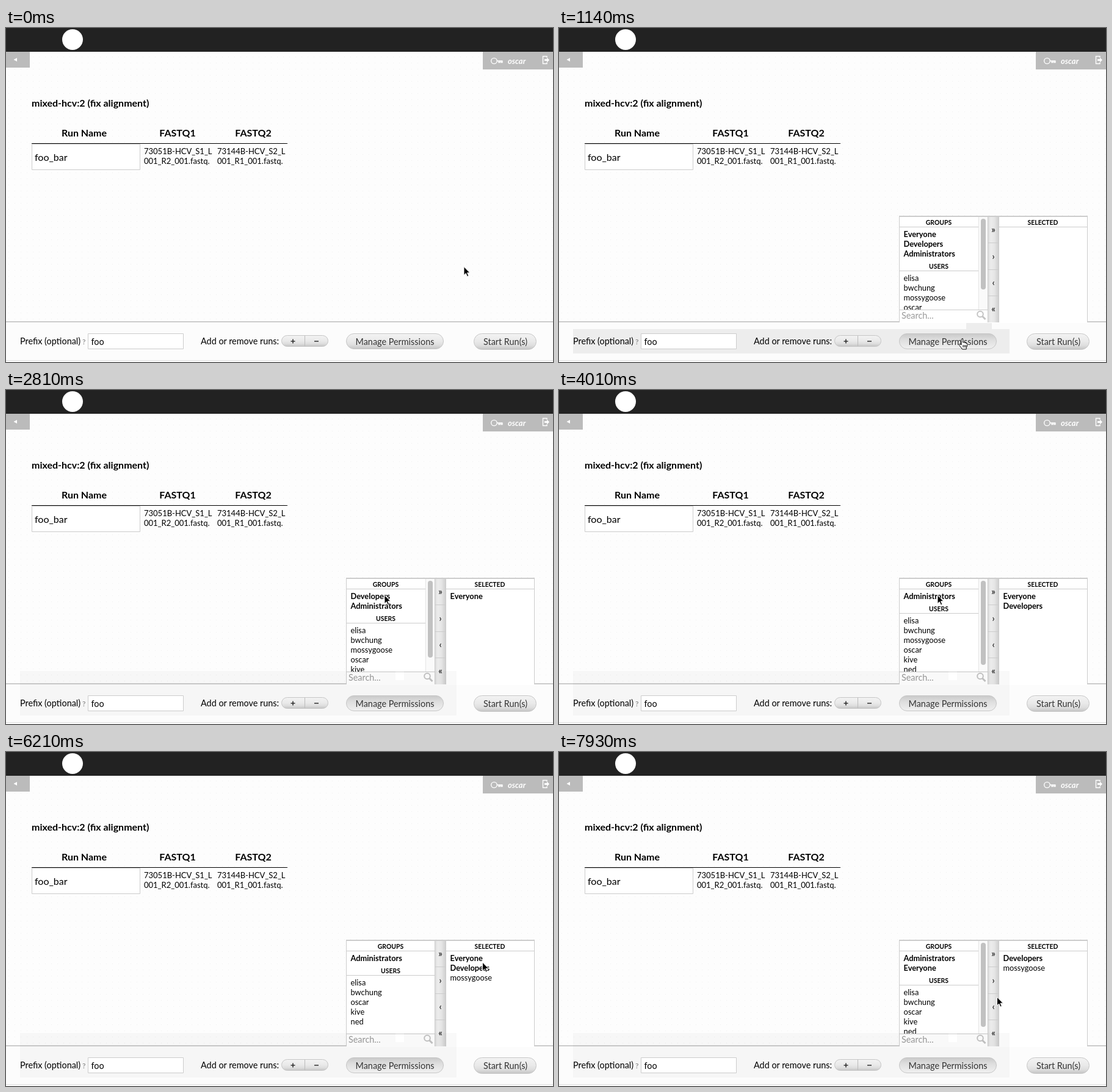
An HTML page that plays this animation: 896 by 548 pixels, repeating every 7990 ms.

```html
<!DOCTYPE html>
<html lang="en">
<head>
<meta charset="utf-8">
<title>Manage permissions</title>
<style>
html, body { margin: 0; width: 100%; height: 100%; overflow: hidden; background: #fdfdfd; }
svg { display: block; width: 896px; height: 548px; font: 14.4px Lato, sans-serif; }
.b { font-weight: bold; }
.mid { text-anchor: middle; }
.h { font-size: 16px; font-weight: bold; }
.cell { font-size: 13px; }
.list { font-size: 12.8px; }
.cap { font-size: 10.4px; font-weight: bold; text-anchor: middle; }
.box { fill: #fff; stroke: #ccc; }
.line { stroke: #ccc; }
.pill { fill: url(#btn); stroke: #c6c6c6; }
.btn { fill: #333; text-anchor: middle; }
</style>
</head>
<body>
<svg viewBox="0 0 896 548">
  <defs>
    <pattern id="dots" width="10" height="10" patternUnits="userSpaceOnUse">
      <path d="M4 7h1v1h-1z" fill="#efefef"/>
    </pattern>
    <linearGradient id="btn" x2="0" y2="1">
      <stop stop-color="#f3f3f3"/><stop offset=".5" stop-color="#e9e9e9"/>
      <stop offset=".75" stop-color="#dedede"/><stop offset="1" stop-color="#c4c4c4"/>
    </linearGradient>
    <linearGradient id="down" x2="0" y2="1">
      <stop stop-color="#c9c9c9"/><stop offset=".4" stop-color="#dedede"/>
      <stop offset="1" stop-color="#f0f0f0"/>
    </linearGradient>
    <linearGradient id="col">
      <stop stop-color="#dcdcdc"/><stop offset=".25" stop-color="#ececec"/>
      <stop offset=".6" stop-color="#e6e6e6"/><stop offset="1" stop-color="#cfcfcf"/>
    </linearGradient>
    <clipPath id="view"><path d="M558 309h145v153h-145z"/></clipPath>
  </defs>

  <path fill="#fdfdfd" d="M0 0h896v548H0z"/>
  <path fill="url(#dots)" d="M0 39h896v443H0z"/>
  <path fill="#222" d="M0 0h896v39H0z"/>
  <circle cx="109" cy="19" r="17" fill="#fff"/>
  <path fill="#bbb" d="M0 39h39v26H0zM781 39h115v29H781z"/>
  <path fill="#fff" d="M12.5 52l5.5-3v6z"/>
  <g fill="none" stroke="#fff" stroke-width="1.4">
    <ellipse cx="799.5" cy="54" rx="4.8" ry="4.6"/>
    <path d="M804 54h9.5M807 54v2.5h2V54M811 54v2.5h2V54M886 48.5v-2h-6.500v12h6.500v-2"/>
  </g>
  <path fill="#fff" d="M882 51h4v-2.500l4 4-4 4V54h-4z"/>
  <text x="822" y="59" class="b" font-size="13" font-style="italic" fill="#fff">oscar</text>

  <text x="42" y="129" class="h">mixed-hcv:2 (fix alignment)</text>
  <g class="h mid">
    <text x="128" y="178">Run Name</text>
    <text x="281" y="178">FASTQ1</text>
    <text x="405" y="178">FASTQ2</text>
  </g>
  <path class="box" d="M42.500 190.500h177v42h-177z"/>
  <path stroke="#000" d="M42 189.500h419"/>
  <text x="47" y="218" font-size="16">foo_bar</text>
  <g class="cell">
    <text x="226" y="207">73051B-HCV_S1_L</text><text x="226" y="223">001_R2_001.fastq.</text>
    <text x="346" y="207">73144B-HCV_S2_L</text><text x="346" y="223">001_R1_001.fastq.</text>
  </g>

  <path fill="#fcfcfc" d="M0 483h896v62H0z"/>
  <path class="line" stroke-width="2" d="M0 482h896"/>
  <path stroke="#ddd" d="M0 545.500h896"/>
  <g id="panel"></g>
  <path id="strip" fill-rule="evenodd"/>

  <text x="23" y="519">Prefix (optional)</text>
  <text x="125" y="519" font-size="12" fill="#777">?</text>
  <path class="box" d="M134.500 501.500h156v25h-156z"/>
  <text x="139.500" y="520">foo</text>
  <text x="319" y="519">Add or remove runs:</text>
  <rect class="pill" x="451.500" y="504.500" width="76" height="18" rx="9"/>
  <path stroke="#bbb" d="M489.500 505v17"/>
  <path stroke="#333" stroke-width="1.600" d="M466.500 514h7M470 510.500v7M505 514h7"/>
  <rect id="manage" class="pill" x="557.500" y="501.500" width="159" height="25" rx="12.500"/>
  <text class="btn" x="637" y="520">Manage Permissions</text>
  <rect class="pill" x="766.500" y="501.500" width="102" height="26" rx="13"/>
  <text class="btn" x="818" y="520">Start Run(s)</text>

  <g id="cursor">
    <g id="ring" fill="none">
      <circle cx="2" r="9" stroke="#333" stroke-width="2.200"/>
      <circle cx="2" r="9" stroke="#fff" stroke-width="1"/>
    </g>
    <path id="arrow" fill="#000" stroke="#fff" d="M.5 0v14l3.300-3 2.200 5.200 2.300-1-2.200-5h4.400z"/>
    <path id="hand" fill="#fff" stroke="#000" stroke-linejoin="round"
      d="M-2 10V1.500q0-1.500 1.300-1.500T.8 1.500V6q2.200-1 2.700.6 2-.7 2.400.8 2-.4 2 1.200 0 4-1.700 6V17H-.5q-1-2-3-4-2.500-3-2.200-4 1-1.500 3.700 1zM1 10v4M3.200 10v4M5.400 10v4"/>
  </g>
</svg>
<script>
const LOOP = 7990;
const $ = id => document.getElementById(id);
const users = ['elisa', 'bwchung', 'mossygoose', 'oscar', 'kive', 'ned'];
const buttons = [['»', 336], ['›', 380], ['‹', 423], ['«', 466]];

// time, x, y of the pointer tip
const path = [
  [0, 749.5, 391.5], [90, 749.5, 391.5], [790, 661, 510], [1410, 661, 510],
  [1920, 619.5, 336.5], [4340, 619.5, 336.5], [5150, 608, 409.5], [5780, 608, 409.5],
  [6210, 780, 345], [6330, 760, 340], [6900, 760, 340], [7220, 736, 349],
  [7630, 711.5, 417], [7830, 711.5, 417], [7930, 717, 402], [LOOP, 717, 402]
];
const clicks = [[1030, 1140], [2460, 2520], [2580, 2640], [3650, 3710], [3770, 3830],
  [5270, 5330], [5390, 5510], [6570, 6630], [7750, 7810]];
const presses = [[2640, 2810], [3830, 4010], [5510, 5630]];
const within = (t, spans) => spans.some(([a, b]) => t >= a && t < b);

function pointer(t) {
  const i = path.findIndex(p => p[0] > t);
  const [t0, x0, y0] = path[i - 1], [t1, x1, y1] = path[i];
  const u = (t - t0) / (t1 - t0), k = u * u * (3 - 2 * u);
  return [x0 + (x1 - x0) * k, y0 + (y1 - y0) * k];
}

function row(name, x, y, width, lit) {
  const bold = users.includes(name) ? '' : ' b';
  const bar = lit ? `<rect x="${x - 6.5}" y="${y - 13}" width="${width}" height="16" fill="#203088"/>` : '';
  return `${bar}<text class="list${bold}" x="${x}" y="${y}" fill="${lit ? '#fff' : '#000'}">${name}</text>`;
}

const caption = (text, x, y) => `<text class="cap" x="${x}" y="${y}">${text}</text>`;
const line = (x0, x1, y) => `<path class="line" d="M${x0} ${y}H${x1}"/>`;

function panel(t) {
  if (t < 1090) return '';
  const returned = t >= 7810;
  const chosen = [];
  if (t >= 2640 && !returned) chosen.push('Everyone');
  if (t >= 3830) chosen.push('Developers');
  if (t >= 5510) chosen.push('mossygoose');
  const free = name => !chosen.includes(name);
  const groups = (returned ? ['Administrators', 'Everyone']
    : ['Everyone', 'Developers', 'Administrators']).filter(free);
  const people = users.filter(free);
  const count = groups.length + people.length;
  const scroll = count > 6, right = scroll ? 687 : 702, mid = scroll ? 622 : 630;
  const lit = within(t, [[2460, 2640]]) ? 'Everyone' : within(t, [[3650, 3830]]) ? 'Developers'
    : within(t, [[5270, 5510]]) ? 'mossygoose' : within(t, [[6570, 7810]]) ? 'Everyone' : '';
  const base = 347 + 16 * groups.length;

  let s = '<path fill="#fff" d="M557 308h309v176h-309z"/><g clip-path="url(#view)">';
  s += caption('GROUPS', mid, 323) + line(558, right, 326.5);
  groups.forEach((g, i) => s += row(g, 564.5, 343 + 16 * i, right - 558, g === lit));
  s += caption('USERS', mid, base) + line(558, right, base + 3.5);
  people.forEach((p, i) => s += row(p, 564.5, base + 20 + 16 * i, right - 558, p === lit));
  if (scroll) {
    s += `<path fill="#fafafa" stroke="#e4e4e4" d="M687.5 309v154h15V309"/>
      <rect x="691" y="313" width="8" height="${23200 / (56 + 16 * count)}" rx="4" fill="#c1c1c1"/>`;
  }
  s += '</g>' + line(558, 702, 462.5) +
    `<text x="561" y="477" fill="#999">Search...</text>
    <g fill="none" stroke="#c4c4c4"><circle cx="690" cy="469.500" r="4.800" stroke-width="2"/>
    <path stroke-width="3" d="M693.500 473l5 5"/></g>
    <path fill="url(#col)" d="M703 309h17v174h-17z"/>`;
  if (within(t, presses)) s += '<path fill="#0002" d="M703 353h17v43h-17z"/>';
  if (within(t, [[7750, 7930]])) s += '<path fill="#0002" d="M703 397h17v43h-17z"/>';
  s += [352.5, 396.5, 439.5].map(y => line(703, 720, y)).join('');
  s += buttons.map(([g, y]) => `<text class="btn b" x="711.500" y="${y}">${g}</text>`).join('');
  s += caption('SELECTED', 792.5, 323) + line(721, 865, 326.5);
  chosen.forEach((c, i) => s += row(c, 727.5, 343 + 16 * i, 144, c === lit));
  return s + `<path fill="none" class="line" d="M557.500 483V309M702.500 309v174M720.500 309v174M865.500 309v174"/>
    <path class="line" stroke-width="2" d="M557 309h309"/>`;
}

let shown;
function draw(now) {
  const t = now % LOOP, [x, y] = pointer(t);
  const html = panel(t);
  if (html !== shown) $('panel').innerHTML = shown = html;

  const dark = t < 1560;
  const tab = t >= 1090 ? 'M667 484h42v10h-42z' : '';
  $('strip').setAttribute('d', t < 600 ? '' : dark ? 'M23 494h715v40H23z' + tab
    : 'M23 461h715v73H23zM638 461h14v15h-14z');
  $('strip').setAttribute('fill', dark ? '#0000000f' : '#00000006');
  $('manage').style.fill = t >= 1030 ? 'url(#down)' : '';

  const over = x > 557 && x < 717 && y > 501 && y < 527;
  $('cursor').setAttribute('transform', `translate(${x} ${y})`);
  $('hand').style.display = over ? '' : 'none';
  $('arrow').style.display = over ? 'none' : '';
  $('ring').style.display = within(t, clicks) ? '' : 'none';
}

const start = performance.now();
function tick() {
  draw(performance.now() - start);
  requestAnimationFrame(tick);
}
tick();
</script>
</body>
</html>
```
